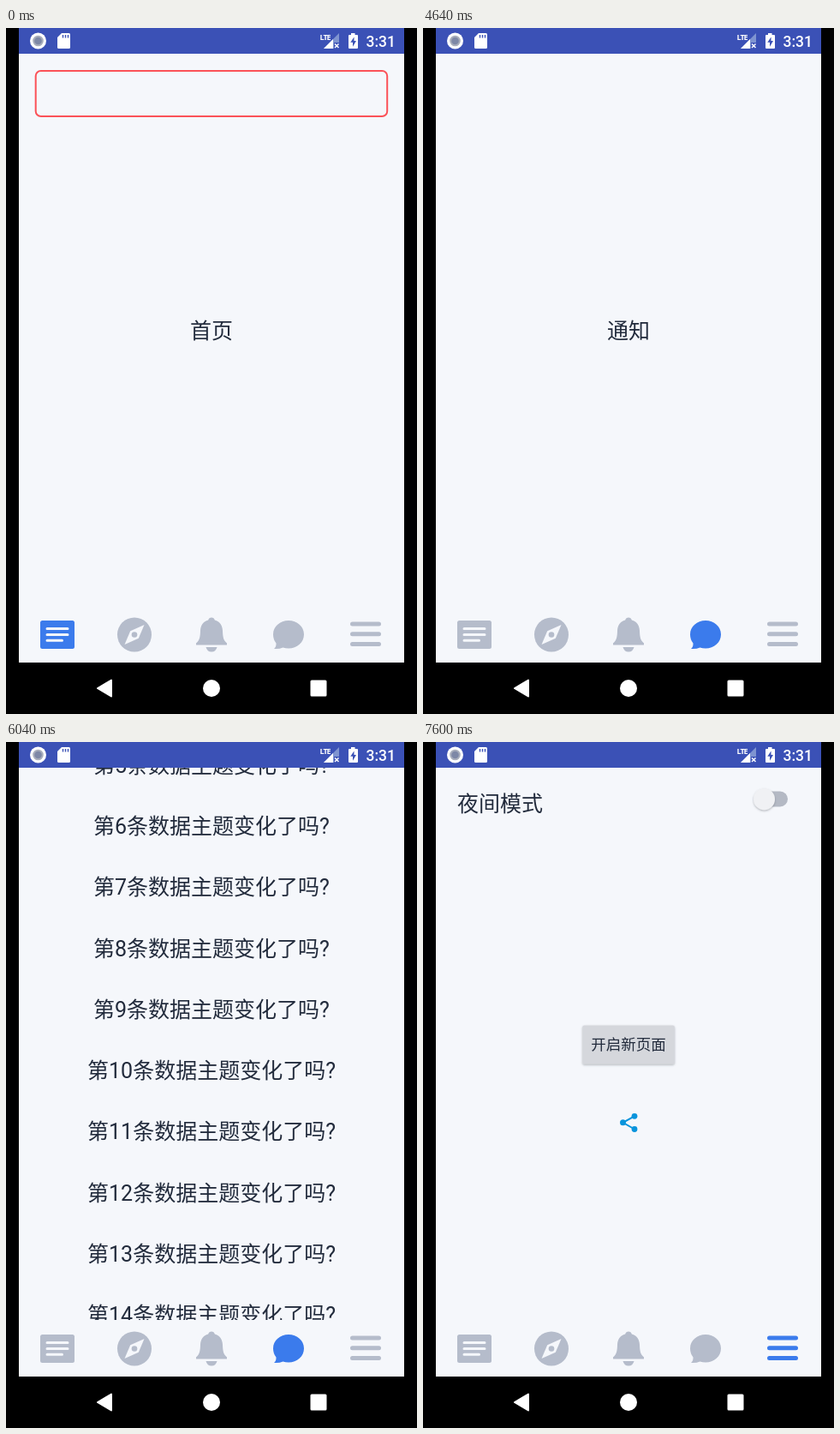
Recreate the animation shown at these times as an HTML page. Size 480 px wide and 800 px high, loop 8 s.

```html
<!DOCTYPE html>
<html lang="zh-CN">
<head>
<meta charset="utf-8">
<title>Tab bar demo</title>
<style>
  html, body { margin: 0; width: 100%; height: 100%; overflow: hidden; background: #000; }
  svg { display: block; width: 100vw; height: 100vh; }
  text { font: 25px Roboto, "Noto Sans CJK SC", "Noto Sans CJK", sans-serif; fill: #222b3c; }
  .mid { text-anchor: middle; }
  .light { fill: #fff; }
  .bar { fill: #3b51b6; }
  .tab { --c: #b5bccb; fill: var(--c); stroke: none; }
  .tab.on { --c: #3b7bec; }
  .paper { fill: #f5f7fb; }
  .line { fill: none; stroke: #f5f7fb; stroke-width: 3; stroke-linecap: round; }
  .menu { fill: none; stroke: var(--c); stroke-width: 5; stroke-linecap: round; }
</style>
</head>
<body>
<svg viewBox="0 0 480 800">
  <defs>
    <clipPath id="content"><rect x="15" y="30" width="450" height="644"/></clipPath>
    <filter id="shadow" x="-30%" y="-30%" width="160%" height="170%">
      <feDropShadow dx="0" dy="1.2" stdDeviation="1.2" flood-color="#444a55" flood-opacity=".4"/>
    </filter>
  </defs>
  <rect width="480" height="800"/>
  <rect class="paper" x="15" y="30" width="450" height="710"/>

  <!-- status bar -->
  <rect class="bar" x="15" width="450" height="30"/>
  <circle class="light" cx="37.5" cy="15" r="9.5"/>
  <circle cx="37.5" cy="15" r="5.3" fill="#7e88a6" stroke="#a9aebb" stroke-width="2"/>
  <path class="light" d="M65 6h8.500q1.500 0 1.500 1.500v15q0 1.500-1.500 1.500h-12q-1.500 0-1.500-1.500v-11.500z"/>
  <path d="M66.500 8v3.500M69.500 8v3.500M72.500 8v3.500" stroke="#3b51b6" stroke-width="1.400"/>
  <path d="M371 24L389 6v11h-6v7z" fill="#7f94d0"/>
  <path class="light" d="M371 24L382 13v11z"/>
  <path d="M384 18.500l4.500 4.500m0-4.500l-4.500 4.500" stroke="#fff" stroke-width="1.500"/>
  <text class="light" x="366.500" y="14" style="font:700 9px 'Open Sans',Roboto,sans-serif;letter-spacing:-1px">LTE</text>
  <path class="light" d="M403 6h4.500v2h2.500q1 0 1 1v14q0 1-1 1h-9q-1 0-1-1v-14q0-1 1-1h2z"/>
  <path class="bar" d="M406.500 10.500l-4.200 6.300h2.700v5l4-6.700h-2.500z"/>
  <text class="light" x="420.500" y="21.500" style="font-size:17.500px;font-weight:500">3:31</text>

  <!-- pages -->
  <g class="page">
    <rect x="34.700" y="50" width="410.500" height="53" rx="6" fill="none" stroke="#fb5258" stroke-width="2"/>
    <text class="mid" x="240" y="362">首页</text>
  </g>
  <g class="page"><text class="mid" x="240" y="362">发现</text></g>
  <g class="page"><text class="mid" x="240" y="362">通知</text></g>
  <g class="page" clip-path="url(#content)">
    <g id="list"></g>
    <ellipse id="glow" cx="240" rx="675" fill="#3f51b5"/>
  </g>
  <g class="page">
    <text x="40" y="81">夜间模式</text>
    <rect x="390" y="57.500" width="36" height="18" rx="9" fill="#b4b9c4"/>
    <circle cx="398.500" cy="66.700" r="12.500" fill="#f0f1f4" filter="url(#shadow)"/>
    <rect x="186.300" y="330.500" width="107.500" height="45" rx="2" fill="#d5d7dc" filter="url(#shadow)"/>
    <text class="mid" x="240" y="359" style="font-size:17.500px">开启新页面</text>
    <g fill="#0a94dc">
      <path d="M247 436.300l-13.500 7.500 13.500 7.700" fill="none" stroke="#0a94dc" stroke-width="2"/>
      <circle cx="233.500" cy="443.800" r="3.500"/>
      <circle cx="247" cy="436.300" r="3.400"/>
      <circle cx="247" cy="451.500" r="3.400"/>
    </g>
  </g>

  <!-- tabs -->
  <g class="tab">
    <rect x="40" y="691" width="40" height="33" rx="2.500"/>
    <path class="line" d="M48 700.500h24M48 707.500h24M48 714.300h17.500"/>
  </g>
  <g class="tab">
    <circle cx="150" cy="707.500" r="20"/>
    <path class="paper" d="M161.500 696L154.800 711.800 138.500 719 145.200 703.200z"/>
    <circle cx="150" cy="707.500" r="3.300"/>
  </g>
  <g class="tab">
    <path d="M240 687.500q3 0 3.800 3c6 1.500 9 6.500 9.200 12.500 .3 8 1 11 5 14.500v2h-36v-2c4-3.500 4.700-6.500 5-14.500 .2-6 3.200-11 9.200-12.500q.8-3 3.800-3z"/>
    <path d="M233.500 722h13q-1.500 5.500-6.500 5.500t-6.500-5.500z"/>
  </g>
  <g class="tab">
    <path d="M330 691c10 0 18 7 18 16.200s-8 16.300-18 16.300q-3.500 0-6.500-1-4.500 2-10.500 1.500 2.800-2.500 2.500-6.500-3.500-4.500-3.500-10.300c0-9.200 8-16.200 18-16.200z"/>
  </g>
  <g class="tab"><path class="menu" d="M404.500 695h31M404.500 706.700h31M404.500 718.500h31"/></g>

  <!-- system navigation -->
  <path class="light" d="M107 770l16-9.500v19z" stroke="#fff" stroke-width="2" stroke-linejoin="round"/>
  <circle class="light" cx="240" cy="770" r="10"/>
  <rect class="light" x="355.500" y="760.500" width="19" height="19" rx="1.500"/>
</svg>
<script>
const LOOP = 8000, STEP = 40;
const ROWS = 20, PITCH = 71.25, MAX_SCROLL = 779.75;
const TAB_TIMES = [0, 2440, 3640, 4640, 7560];
const PAGE_TIMES = [0, 2480, 3680, 4720, 7600];
const DRAG_START = 5560, LIST_END = 6235, GLOW_PEAK = 6355, GLOW_END = 7160;

const tabs = document.querySelectorAll('.tab');
const pages = document.querySelectorAll('.page');
const list = document.getElementById('list');
const glow = document.getElementById('glow');

for (let i = 0; i < ROWS; i++) {
  const row = document.createElementNS('http://www.w3.org/2000/svg', 'text');
  row.setAttribute('class', 'mid');
  row.setAttribute('x', 240);
  row.setAttribute('y', 75 + i * PITCH);
  row.textContent = `第${i}条数据主题变化了吗?`;
  list.append(row);
}

const clamp = v => Math.min(1, Math.max(0, v));
const progress = (t, from, to) => clamp((t - from) / (to - from));
const activeIndex = (times, t) => times.filter(start => start <= t).length - 1;

// The flick speeds up steadily until the list hits its end.
function scrollAt(t) {
  if (t < DRAG_START) return 0;
  return 2 + (MAX_SCROLL - 2) * progress(t, DRAG_START, LIST_END) ** 2;
}

// The edge glow swells on impact, then recedes.
function drawGlow(t) {
  const swell = 1 - (1 - progress(t, LIST_END, GLOW_PEAK)) ** 2;
  const fade = (1 - progress(t, GLOW_PEAK, GLOW_END)) ** 2;
  const size = swell * fade, ry = 675 * size;
  glow.setAttribute('ry', ry);
  glow.setAttribute('cy', 674 - 90.4 * size + ry);
  glow.setAttribute('opacity', size > 0 ? (0.3 + 0.06 * swell) * fade : 0);
}

function draw(t) {
  const tab = activeIndex(TAB_TIMES, t), page = activeIndex(PAGE_TIMES, t);
  tabs.forEach((el, i) => el.classList.toggle('on', i === tab));
  pages.forEach((el, i) => { el.style.display = i === page ? '' : 'none'; });
  list.setAttribute('transform', `translate(0 ${-scrollAt(t)})`);
  drawGlow(t);
}

const start = performance.now();
function tick() {
  const t = (performance.now() - start) % LOOP;
  draw(Math.floor(t / STEP) * STEP);
  requestAnimationFrame(tick);
}
tick();
</script>
</body>
</html>
```
